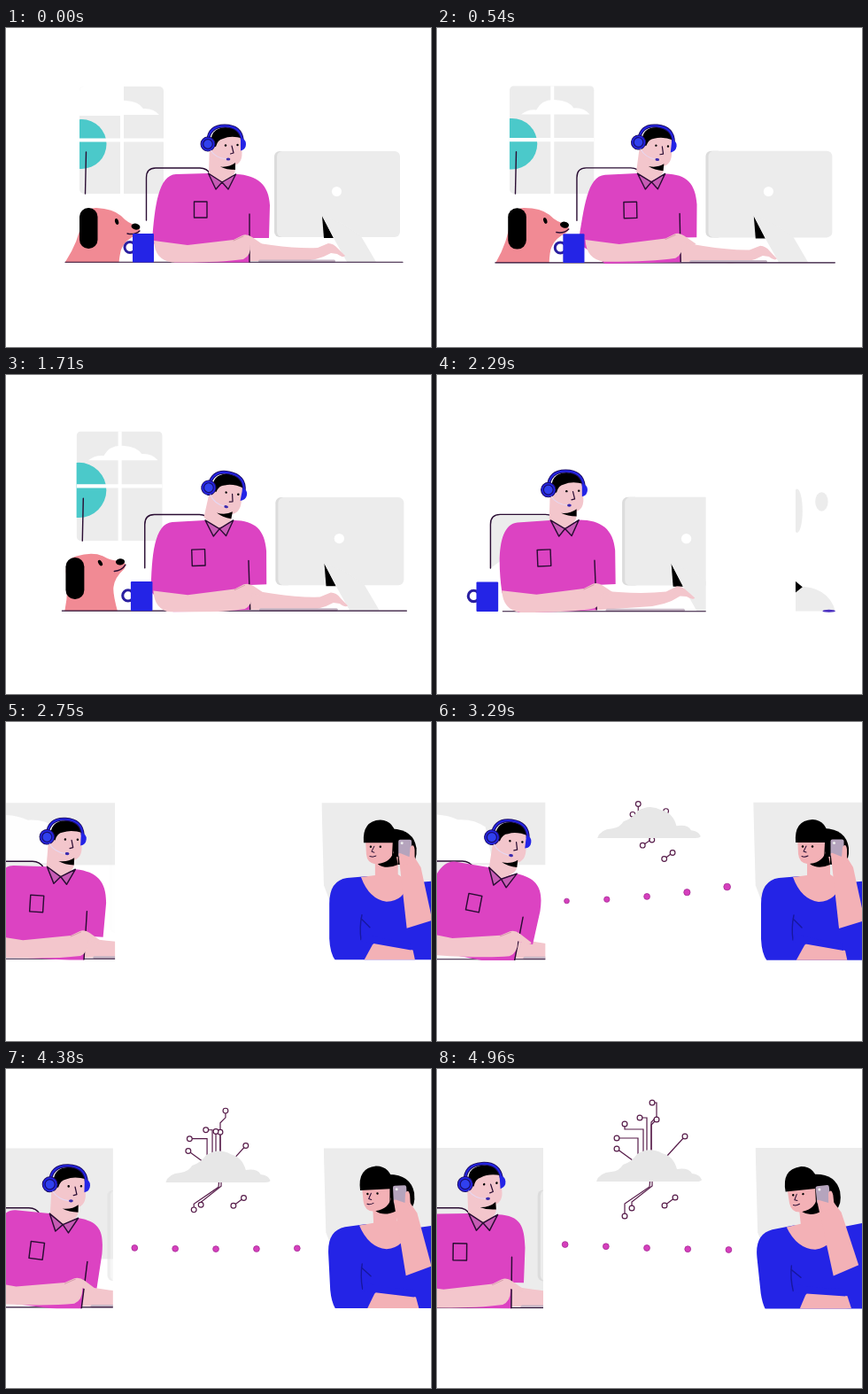
An HTML page for the animation above (5000 ms loop, 480 by 360 pixels).

```html
<!DOCTYPE html>
<html lang="en">
<head>
<meta charset="utf-8">
<title>Working together</title>
<style>
html, body { margin: 0; width: 100%; height: 100%; overflow: hidden; background: #fff; }
svg { display: block; width: 100vw; height: 100vh; }
.ink { fill: none; stroke: #2a0d33; stroke-width: 1.4; stroke-linejoin: round; stroke-linecap: round; }
.wire { fill: none; stroke: #561b49; stroke-width: 1.2; }
.tip { fill: #fff; stroke: #561b49; stroke-width: 1.2; }
.shirt { fill: #dc43c2; }
.skin { fill: #f3c6cc; }
.tan { fill: #f3b1b6; }
.blue { fill: #2424e6; }
.grey { fill: #ececec; }
</style>
</head>
<body>
<svg viewBox="0 0 480 360">
<defs>
  <clipPath id="leftClip"><rect id="leftBox" x="-20"/></clipPath>
  <clipPath id="rightClip"><rect id="rightBox" width="260" y="94.3" height="171"/></clipPath>
  <clipPath id="tableClip"><rect width="480" height="264.5"/></clipPath>
  <clipPath id="paneClip"><rect x="83" y="66" width="95" height="121" rx="5"/></clipPath>
</defs>
<g id="camera">
  <g clip-path="url(#leftClip)">
    <rect id="leftWall" class="grey" x="-20" y="90" width="147.500"/>
    <path id="leftMist" fill="#fff" d="M-20 111Q10 103 32 113Q50 112 62 121L70 160H-20Z"/>
    <g id="desk">
      <g id="window" clip-path="url(#paneClip)">
        <rect class="grey" x="83" y="66" width="95" height="121"/>
        <path fill="#fff" d="M96 98Q104 92 113 93Q120 80 136 82Q150 83 155 91Q166 90 173 98Z"/>
        <circle id="sun" cx="85.5" cy="131" fill="#4bc9ca"/>
        <rect id="blind" x="80" y="62" width="51" height="37" fill="#fff"/>
        <path stroke="#fff" stroke-width="4" d="M131 66V187M83 126.5H178"/>
      </g>
      <path id="pole" class="ink" d="M90.5 140L89.5 187"/>
      <path class="ink" id="chair" d="M158.5 217V169Q158.5 158 169 158H219Q227 158 231 165"/>
      <g clip-path="url(#tableClip)">
        <g id="dog">
          <path fill="#f18a94" d="M50 310L67 264Q82 241 86 216Q90 203 102 203Q121 204 130 212Q138 221 148 223Q154 229 148 233Q135 239 131 248Q126 257 126 310Z"/>
          <ellipse cx="146.500" cy="224" rx="5" ry="3.5" transform="rotate(12 146 224)"/>
          <ellipse cx="125" cy="218.500" rx="2" ry="3.500" transform="rotate(-15 125 218)"/>
          <path class="ink" d="M137 232Q145 234 151 229"/>
          <g id="ear"><rect x="83" y="203" width="20.5" height="46" rx="10"/></g>
        </g>
      </g>
      <g id="monitor">
        <rect x="303" y="139" width="20" height="97" rx="6" fill="#dcdcdc"/>
        <rect class="grey" x="306" y="139" width="139" height="97" rx="6"/>
        <circle cx="373.500" cy="184.500" r="5.500" fill="#fff"/>
        <path d="M357 212L370 237H359Z"/>
        <path class="grey" d="M357 212L380 221L401 235L418 264H385L370 237Z"/>
      </g>
      <g id="reach">
        <path class="skin" d="M272 241L300 245Q330 249 352 248L364 243Q370 243 375 249L383 257Q381 260 374 255L367 254Q350 264 325 263H272Z"/>
      </g>
      <rect x="285" y="261.500" width="87" height="3" rx="1.500" fill="#c4b4c3"/>
      <line id="table" class="ink" style="stroke-width:1.1" x2="448" y1="264.300" y2="264.300"/>
      <g id="torso">
        <path id="shirt" class="shirt"/>
        <path class="ink" d="M275 210V264"/>
        <rect class="ink" x="212.500" y="196" width="14.500" height="18"/>
      </g>
      <g id="head">
        <path class="skin" d="M230 130H242L259 150V160Q259 167 244 174L229 164Z"/>
        <path class="skin" d="M233 121L265 119L266.500 141Q267 155 253 156Q241 156 236 142Z"/>
        <path d="M242 156.500Q252 157.500 259 152V160Q249 160 242 156.500Z"/>
        <path d="M232 133Q229 113 248 112Q266 113 267 124.500Q254 121 245 125Q239 126 237 134Z"/>
        <path fill="none" stroke="#1c0f6a" stroke-width="3.800" d="M228 128Q229 110.500 247 110.500Q265 110.500 267 127"/>
        <path fill="none" stroke="#2424e6" stroke-width="1.800" d="M228 128Q229 110.500 247 110.500Q265 110.500 267 127"/>
        <path class="blue" d="M265 124.500Q271 125 271 131Q271 137 265 138.500Z"/>
        <circle cx="228" cy="131" r="8" fill="#2424e6" stroke="#1c0f6a"/>
        <circle cx="228" cy="131" r="5.300" fill="#3040ee" stroke="#180f70" stroke-width="1.200"/>
        <path fill="none" stroke="#e5d9f5" d="M231 138Q237 147 249 148"/>
        <ellipse cx="251" cy="148" rx="2.300" ry="1.500" fill="#3a2aae"/>
        <circle cx="248" cy="132.500" r="1.200"/><circle cx="261.500" cy="132" r="1.200"/>
        <path class="ink" style="stroke-width:1.200" d="M255 133L257 141L253.500 142"/>
      </g>
      <g id="collar">
        <path class="ink" style="fill:#c65bb4" d="M228.500 164L237 182L244 174L251 182L259.500 165L244 174Z"/>
      </g>
      <g id="arm">
        <path class="skin" d="M167 240L205 245L257 239L267 234Q272 232 278 236L291 245Q290 248 283 246L276 244Q277 257 268 261Q240 265 188 264.500Q168 262 167 240Z"/>
        <path class="ink" style="stroke:#d9a0ae;stroke-width:1" d="M257 240L268 235"/>
      </g>
      <circle cx="140" cy="247.500" r="6" fill="none" stroke="#2a1fa0" stroke-width="3"/>
      <rect class="blue" x="143" y="232" width="24" height="32.500" rx="1"/>
    </g>
  </g>

  <g clip-path="url(#rightClip)">
    <path id="rightWall" class="grey" d="M352.500 90H500V200H361L355 184Z"/>
    <g id="props">
      <ellipse class="grey" cx="402" cy="154" rx="6" ry="24"/>
      <ellipse class="grey" cx="429" cy="144" rx="7" ry="10.500"/>
      <path class="grey" d="M400 237Q436 236 444 264H400Z"/>
      <path d="M400 231L408 237.500L400 244Z"/>
      <ellipse cx="437" cy="264" rx="7" ry="1.500" fill="#4a2fc0"/>
    </g>
    <g transform="translate(240 180) scale(.9606) translate(-240 -180)">
      <g id="woman">
        <path d="M437 120Q462 121 465 142Q466 157 458 162L436 160Z"/>
        <path class="blue" d="M378 274Q367 268 366 245V205Q366 179 386 176L410 174L455 182L500 178V300H378Z"/>
        <path class="tan" d="M402 175L418 173V152L444 152V172L456 180Q452 202 431 203Q411 200 402 175Z"/>
        <path d="M421 160L440 141L444 161Q430 167 421 160Z"/>
        <path class="tan" d="M407 130H439V147Q434 160 418 160Q409 159 408 149Z"/>
        <path d="M405 136Q403 111 424 110Q441 111 442 132L437 155L438 136Z"/>
        <circle cx="413" cy="140.500" r="1.200"/><circle cx="424" cy="140.500" r="1.200"/>
        <path class="ink" style="stroke-width:1" d="M417 140L414 146L417 147M412 151.500Q415 153 419 151"/>
        <path class="ink" style="stroke:#1717a0" d="M403 218Q400 232 402 246M402 222L412 232"/>
        <path class="tan" d="M404 272L415 252Q419 247 428 249L461 258L464 272Z"/>
        <path class="blue" d="M404 238Q425 246 458 249L459 258L402 248Z"/>
        <g id="phoneArm">
          <path class="tan" d="M445 152L462 151L470 164L483 224L454 233Z"/>
          <rect x="444.500" y="132.500" width="15" height="20" rx="2" fill="#b5a4bd"/>
          <circle cx="448.500" cy="136.500" r="1.500" fill="#eee"/>
          <path class="tan" d="M446 153Q443 147 447 148L457 152L458 141Q462 136 463 144V158L450 162Z"/>
        </g>
      </g>
    </g>
  </g>

  <g id="dots" fill="#d63fbd" stroke="#a82f98" stroke-width=".8"></g>
  <g transform="translate(240 180) scale(.9416) translate(-240 -180)">
    <g id="circuits"></g>
    <g id="cloud">
      <path fill="#e7e7e7" d="M180 127Q183 117 197 116Q206 115 210 108Q220 105 226 96Q240 87 254 95Q267 98 271 113Q284 111 288 118Q297 119 299 125Q298 127 293 127Z"/>
    </g>
  </g>
</g>
</svg>
<script>
const LOOP = 5000;
const el = id => document.getElementById(id);
const set = (node, attrs) => { for (const k in attrs) node.setAttribute(k, attrs[k]); };
const move = (id, value) => el(id).setAttribute('transform', value);
const fade = (id, value) => el(id).setAttribute('opacity', value);
const mix = (a, b, p) => a + (b - a) * p;

function ease(t, start, end) {
  const p = Math.min(1, Math.max(0, (t - start) / (end - start)));
  return p * p * (3 - 2 * p);
}

function key(t, times, values) {
  let v = values[0];
  for (let i = 1; i < times.length; i++) {
    if (t > times[i - 1]) v = mix(values[i - 1], values[i], ease(t, times[i - 1], times[i]));
  }
  return v;
}

const BEATS = [0, 1080, 1710, 2290, 3290, 3880, 4960];
const pose = {
  lean: [0, -2.3, -1.8, -2.3, 11, 12.5, .6],
  headX: [0, -7, -4.7, -6, 19.3, 23, 0],
  headY: [0, 0, 0, 0, 3, 3.5, .7],
  headTilt: [0, 12, 11, 0, 7, 6, -4],
  cuff: [165, 156, 166, 172, 165, 165, 160],
  shoulder: [298, 291, 295, 298, 292, 290, 289],
  handX: [0, 2, 1, 4, 3, 2, -2],
  handY: [0, -4, 1, 0, 1, 0, 0],
  reach: [0, 3, .8, -4, 2, 1, 0],
  dog: [0, -5, -18, -18, -18, -18, -18]
};

// Each wire: corner points, then how far it has grown at two moments.
const wires = [
  [[[242, 100], [242, 60], [248, 54], [248, 38], [243, 38]], 0, .6],
  [[[242, 100], [242, 63], [248, 57]], 0, .26],
  [[[237, 100], [237, 55], [229, 55]], 0, .1],
  [[[233, 100], [233, 68], [212, 68], [212, 62]], 0, .3],
  [[[227, 108], [227, 78], [203, 78]], .32, .84],
  [[[225, 106], [203, 90]], .2, .75],
  [[[259, 99], [280, 76]], 0, .1],
  [[[241, 122], [240, 133], [212, 152], [212, 166]], .35, .74],
  [[[243, 122], [243, 132], [220, 150], [220, 157]], .22, .82],
  [[[257, 154], [269, 145]], .8, .95, true]
];

function add(parent, tag, attrs) {
  const node = document.createElementNS('http://www.w3.org/2000/svg', tag);
  set(node, attrs);
  return el(parent).appendChild(node);
}

const wireNodes = wires.map(([pts, , , doubleEnded]) => ({
  line: add('circuits', 'polyline', { class: 'wire' }),
  tip: add('circuits', 'circle', { class: 'tip', r: 2.9 }),
  root: doubleEnded && add('circuits', 'circle', { class: 'tip', r: 2.9, cx: pts[0][0], cy: pts[0][1] })
}));
const dotNodes = [0, 1, 2, 3, 4].map(i => add('dots', 'circle', { cx: 150.2 + 43.5 * i }));

function trace(pts, portion) {
  const spans = pts.slice(1).map((p, i) => Math.hypot(p[0] - pts[i][0], p[1] - pts[i][1]));
  let left = portion * spans.reduce((a, b) => a + b);
  const out = [pts[0]];
  for (let i = 0; i < spans.length && left > 0; i++) {
    const p = Math.min(1, left / spans[i]);
    out.push([mix(pts[i][0], pts[i + 1][0], p), mix(pts[i][1], pts[i + 1][1], p)]);
    left -= spans[i];
  }
  return out;
}

function drawDesk(t) {
  const at = name => key(t, BEATS, pose[name]);
  const split = ease(t, 1890, 2680);
  set(el('leftBox'), { y: 94.3 * split, width: mix(505, 147, split), height: 265.5 - 94.3 * split });
  move('desk', `translate(${-182 * split})`);
  const wall = ease(t, 2450, 2800), settle = ease(t, 3880, 4900);
  set(el('leftWall'), { height: mix(72, 176, settle) });
  fade('leftWall', wall);
  fade('leftMist', wall * (1 - ease(t, 3300, 3800)));
  fade('monitor', 1 - wall + settle);
  const scenery = 1 - ease(t, 2150, 2280);
  ['window', 'pole', 'dog'].forEach(id => fade(id, scenery));
  fade('blind', 1 - ease(t, 60, 360));
  set(el('sun'), { r: mix(28, 30.5, ease(t, 0, 1700)) });
  set(el('chair'), { style: `fill:rgba(236,236,236,${1 - scenery})` });
  set(el('table'), { x1: mix(172, 67, scenery) });

  const dog = at('dog');
  move('dog', `rotate(${dog} 95 265)`);
  move('ear', `rotate(${-dog} 93 226)`);

  const lean = `rotate(${at('lean')} 235 265)`;
  const cuff = at('cuff'), side = at('shoulder');
  move('torso', lean);
  move('collar', lean);
  set(el('shirt'), { d: `M${cuff} 241C168 201 172 166 192 165L228 164L244 172L260 165C284 166 ${side - 1} 177 ${side} 200L${side - 1} 237H275V264.500H190L176 252Z` });
  move('head', `translate(${at('headX')} ${at('headY')}) rotate(${at('headTilt')} 245 160)`);
  move('arm', `translate(${at('handX')} ${at('handY')}) rotate(${at('lean') * .3} 285 245)`);
  move('reach', `rotate(${at('reach')} 275 255)`);
}

function drawWoman(t) {
  const open = ease(t, 1850, 2600);
  set(el('rightBox'), { x: mix(482, 352.5, open) });
  fade('rightWall', ease(t, 2400, 2700));
  fade('props', 1 - ease(t, 2300, 2450));
  const turn = ease(t, 3880, 4900);
  move('woman', `translate(${130 * (1 - ease(t, 2300, 2750))}) rotate(${-6 * turn} 430 275)`);
  move('phoneArm', `translate(${-6 * turn} ${turn})`);
}

function drawLink(t) {
  const times = [3290, 3880, 4960];
  const first = key(t, times, [201.1, 203.8, 197]);
  const last = key(t, times, [185.8, 200, 202.6]);
  const bow = key(t, times, [2.8, 1, .9]);
  dotNodes.forEach((dot, i) => {
    const u = i / 4, start = 2950 + (4 - i) * 40;
    set(dot, {
      cy: mix(first, last, u) + 4 * u * (1 - u) * bow,
      r: ease(t, start, start + 200) * mix(mix(2.8, 3.7, u), 3.2, ease(t, 3290, 3880)),
      opacity: t > start ? 1 : 0
    });
  });

  const rise = key(t, times, [3, 1, 0]);
  move('cloud', `translate(240 ${127 + rise}) scale(${ease(t, 2800, 3120)}) translate(-240 -127)`);
  wires.forEach(([pts, early, mid], i) => {
    const { line, tip, root } = wireNodes[i];
    const grown = key(t, [3120, 3290, 3880, 4850], [0, early, mid, 1]);
    const path = trace(pts, grown), end = path[path.length - 1];
    const opacity = grown > 0 ? 1 : 0;
    set(line, { points: path.join(' '), opacity });
    set(tip, { cx: end[0], cy: end[1], opacity });
    if (root) set(root, { opacity });
  });
}

function draw(t) {
  move('camera', `translate(240 180) scale(${1 + t * .0000125}) translate(-240 -180)`);
  drawDesk(t);
  drawWoman(t);
  drawLink(t);
}

const began = performance.now();
function tick() {
  draw((performance.now() - began) % LOOP);
  requestAnimationFrame(tick);
}
tick();
</script>
</body>
</html>
```
